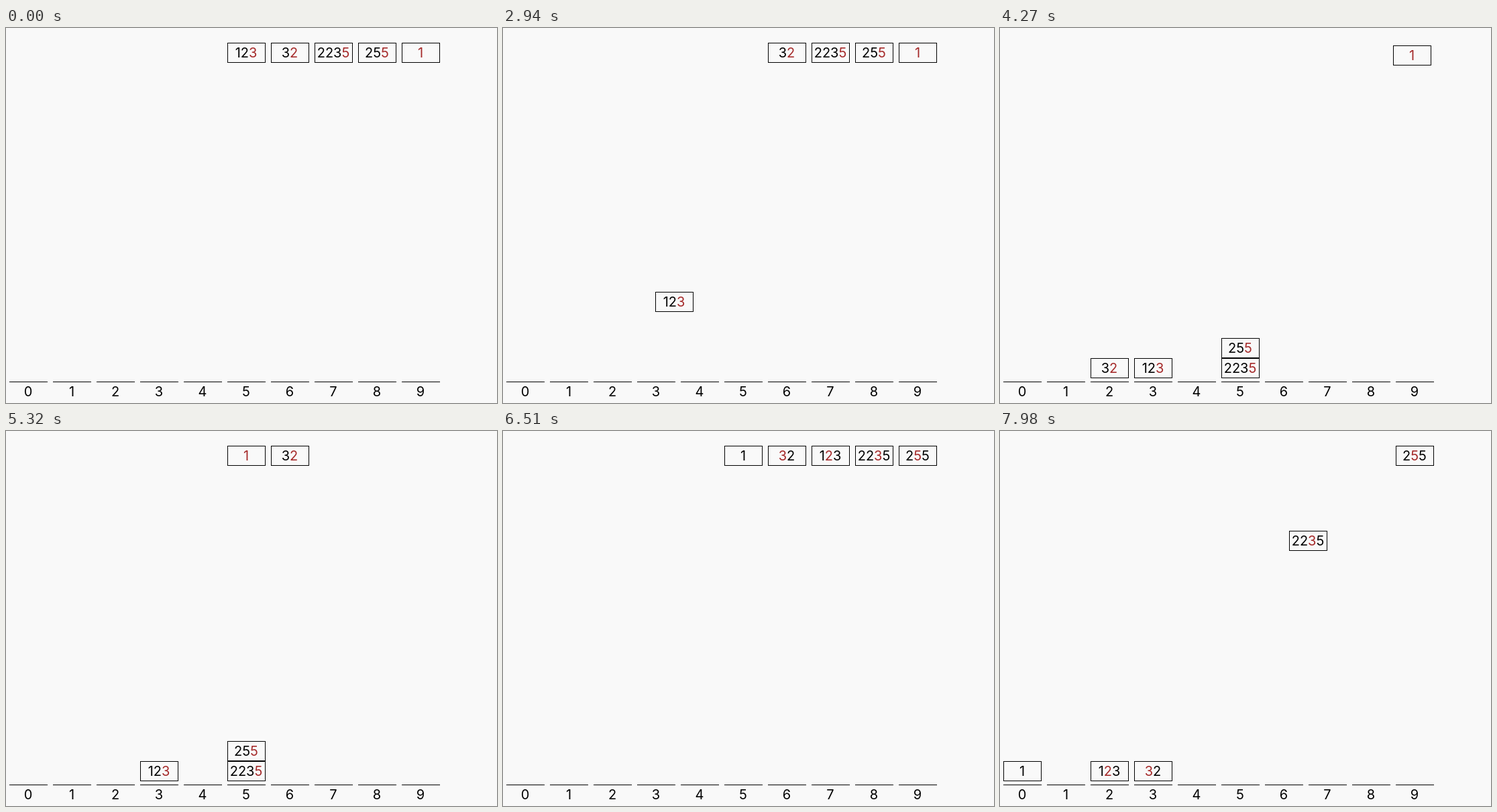
Animation of 732x560 px, one loop 8 s. Source, as an HTML page with a canvas:

```html
<!DOCTYPE html>
<html lang="en">
<head>
<meta charset="utf-8">
<title>Radix sort</title>
<style>
  html, body { margin: 0; width: 732px; height: 560px; overflow: hidden; background: #f9f9f9; }
  canvas { display: block; }
</style>
</head>
<body>
<canvas id="stage" width="732" height="560"></canvas>
<script>
const ctx = document.getElementById('stage').getContext('2d');
const LOOP = 8000;
const BEAT = 363.75;      // time between two moves
const FIRST = 2784.5;     // start of the first move
const MOVE = 250;         // length of one move
const BOX_W = 57, BOX_H = 30, TOP = 22, FLOOR = 493;
const RED = [165, 42, 42];

const clamp = v => Math.min(1, Math.max(0, v));
const ease = t => t < 0.5 ? 4 * t ** 3 : 1 - 4 * (1 - t) ** 3;
const column = i => 5 + 65 * i;
const beatTime = n => FIRST + n * BEAT;

const items = ['123', '32', '2235', '255', '1'].map((text, i) => ({
  text, x: column(5 + i), y: TOP, moves: []
}));

function digitAt(text, place) {
  return Number(text[text.length - 1 - place] || 0);
}

// Plan every move: deal into buckets, collect in order, deal by the next place.
let beat = 0;
function deal(order, place) {
  const buckets = Array.from({ length: 10 }, () => []);
  for (const item of order) {
    const d = digitAt(item.text, place);
    const y = FLOOR - BOX_H * buckets[d].length;
    item.moves.push({ at: beatTime(beat++), x: column(d), y });
    buckets[d].push(item);
  }
  return buckets;
}

function collect(buckets) {
  const order = [];
  buckets.forEach((queue, d) => {
    while (queue.length) {
      const item = queue.shift();
      const at = beatTime(beat++);
      item.moves.push({ at, x: column(5 + order.length), y: TOP });
      queue.forEach((rest, i) =>
        rest.moves.push({ at, x: column(d), y: FLOOR - BOX_H * i }));
      order.push(item);
    }
  });
  return order;
}

const sorted = collect(deal(items, 0));
const nextPlace = beatTime(beat++);
deal(sorted, 1);

function position(item, t) {
  let { x, y } = item;
  for (const m of item.moves) {
    const k = ease(clamp((t - m.at) / MOVE));
    x += (m.x - x) * k;
    y += (m.y - y) * k;
  }
  return [Math.round(x), Math.round(y)];
}

function drawNumber(text, cx, baseline, marked, color) {
  const widths = [...text].map(c => ctx.measureText(c).width);
  let x = cx - widths.reduce((a, b) => a + b, 0) / 2;
  [...text].forEach((c, i) => {
    ctx.fillStyle = i === marked ? color : '#000';
    ctx.fillText(c, x, baseline);
    x += widths[i];
  });
}

function drawBuckets(alpha) {
  ctx.globalAlpha = alpha;
  for (let i = 0; i < 10; i++) {
    ctx.fillStyle = '#000';
    ctx.fillRect(column(i), 528, BOX_W, 1);
    drawNumber(String(i), column(i) + 28, 550, -1);
  }
  ctx.globalAlpha = 1;
}

function draw(t) {
  ctx.fillStyle = '#f9f9f9';
  ctx.fillRect(0, 0, 732, 560);
  ctx.font = '20px Inter, sans-serif';
  ctx.lineWidth = 1;
  ctx.strokeStyle = '#000';

  const shown = t < 2000
    ? 1 - ease(clamp((t - 1020) / 240))
    : clamp((t - 2420) / 90);
  const color = `rgb(${RED.map(c => Math.round(c * shown))})`;
  const place = t < nextPlace ? 0 : 1;

  if (shown > 0) drawBuckets(shown);
  for (const item of items) {
    const [x, y] = position(item, t);
    ctx.strokeRect(x + 0.5, y + 0.5, BOX_W - 1, BOX_H - 1);
    drawNumber(item.text, x + 28, y + 22, item.text.length - 1 - place, color);
  }
}

const begin = performance.now();
function tick() {
  draw((performance.now() - begin) % LOOP);
  requestAnimationFrame(tick);
}
tick();
</script>
</body>
</html>
```
